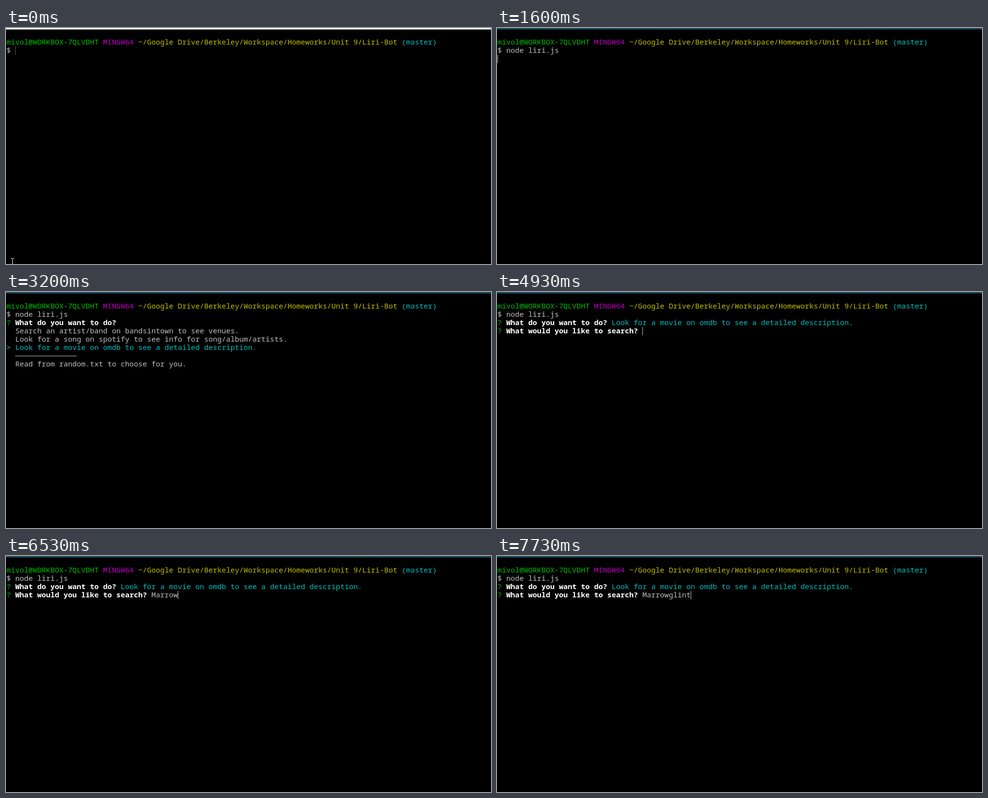
These frames come from a looping animation (994x485 px, 8000 ms). An HTML page:

```html
<!DOCTYPE html>
<html lang="en">
<head>
<meta charset="utf-8">
<style>
html, body { margin: 0; width: 100%; height: 100%; overflow: hidden; background: #000; }
#bar { position: absolute; left: 0; top: 0; width: 100%; height: 3px; }
#term { position: absolute; left: 1px; top: 20px; color: #bfbfbf;
  font: 500 15px/17px "Noto Sans Mono", "DejaVu Sans Mono", monospace; }
#term div { height: 17px; white-space: pre; }
.g { color: #00bf00; } .m { color: #bf00bf; } .y { color: #bfbf00; } .c { color: #00bfbf; }
.w { color: #fff; font-weight: 600; } .d { color: #808080; }
.rule { display: block; width: 126px; height: 1px; margin-left: 18px; position: relative; top: 9px; background: #bfbfbf; }
#cursor { position: absolute; width: 0; height: 17px; border-left: 1px solid #bfbfbf; }
#mouse { position: absolute; }
</style>
</head>
<body>
<div id="bar"></div>
<div id="term"></div>
<div id="cursor"></div>
<svg id="mouse" width="7" height="16" fill="none" stroke="#fff" shape-rendering="crispEdges">
  <path d="M0 .5H3M4 .5H7M3.5 1V15M0 15.5H3M4 15.5H7"/>
</svg>
<script>
const $ = id => document.getElementById(id);
const span = (cls, text) => `<span class="${cls}">${text}</span>`;

const prompt = [span('g', 'mivol@WORKBOX-7QLVDHT'), span('m', 'MINGW64'),
  span('y', '~/Google Drive/Berkeley/Workspace/Homeworks/Unit 9/Liri-Bot'), span('c', '(master)')].join(' ');
const ask = text => span('g', '?') + ' ' + span('w', text) + ' ';
const options = [
  'Search an artist/band on bandsintown to see venues.',
  'Look for a song on spotify to see info for song/album/artists.',
  'Look for a movie on omdb to see a detailed description.'
];
const title = 'Marrowglint';
const question = 'What do you want to do?';

// [start time, typed letters, cursor shown]; -1 letters means the line is being redrawn
const typing = [
  [4930, 0, 1], [5400, 0, 0], [5600, 1, 0], [5670, 1, 1], [5870, -1, 0], [5930, 2, 1],
  [6000, 3, 1], [6130, 4, 1], [6200, 5, 1], [6530, 6, 1], [6600, 7, 1], [6800, -1, 0],
  [6870, 8, 1], [7270, -1, 0], [7330, 9, 1], [7470, 10, 1], [7730, 11, 1]
];

function menu(t) {
  const pick = t < 2800 ? 0 : t < 3200 ? 1 : 2;
  return [
    ask(question) + (pick ? '' : span('d', '(Use arrow keys)')),
    ...options.map((o, i) => i === pick ? span('c', '&gt; ' + o) : '  ' + o),
    '<i class="rule"></i>',
    '  Read from random.txt to choose for you.'
  ];
}

// Returns the text lines and the cursor as [column, row], or null when hidden
function scene(t) {
  const lines = [prompt, '$ ' + (t < 1070 ? '' : 'node liri.js')];
  if (t < 1070) return [lines, t < 730 ? [2, 1] : null];
  if (t < 1600) return [lines, [14, 1]];
  if (t < 2270) return [lines, [0, 2]];
  if (t < 4930) return [lines.concat(menu(t)), null];
  const [, n, on] = typing.findLast(step => t >= step[0]);
  lines.push(ask(question) + span('c', options[2]));
  if (n >= 0) lines.push(ask('What would you like to search?') + title.slice(0, n));
  return [lines, on ? [33 + n, 3] : null];
}

let shown = '';
function draw() {
  const t = performance.now() % 8000;
  const [lines, cursor] = scene(t);
  const html = lines.map(l => `<div>${l}</div>`).join('');
  if (html !== shown) $('term').innerHTML = shown = html;

  const focused = t >= 330;
  $('bar').style.background = focused ? '#1c4a5e' : '#fff';
  const cs = $('cursor').style;
  cs.display = cursor ? 'block' : 'none';
  cs.borderLeftStyle = focused ? 'solid' : 'dotted';
  if (cursor) {
    cs.left = 1 + cursor[0] * 9 + 'px';
    cs.top = 38 + (cursor[1] - 1) * 17 + 'px';
  }

  const way = t < 70 ? 0 : t < 130 ? .5 : 1;
  const ms = $('mouse').style;
  ms.display = t < 800 ? 'block' : 'none';
  ms.left = Math.round(10 + 312 * way) + 'px';
  ms.top = Math.round(473 - 114 * way) + 'px';
  requestAnimationFrame(draw);
}
draw();
</script>
</body>
</html>
```
